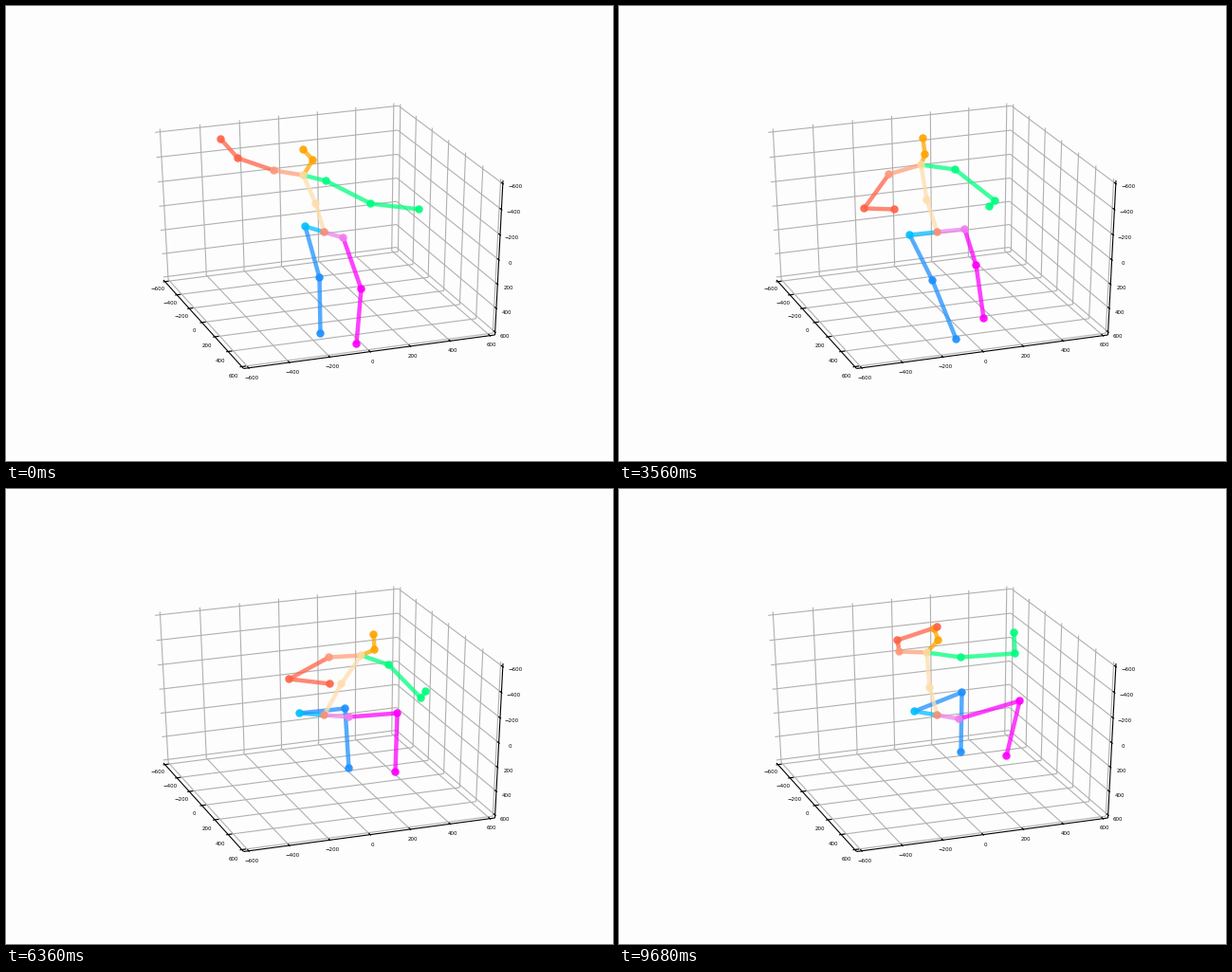
Write a matplotlib script that moves like this. It is 640 px wide and 480 px high and loops after 9.72 s.

```python
import matplotlib.pyplot as plt
import numpy as np
from matplotlib.animation import FuncAnimation
from matplotlib.collections import LineCollection

W, H, DPI = 640, 480, 100
FRAMES, STEP = 243, 40
BG = "#fdfdfd"

fig = plt.figure(figsize=(W / DPI, H / DPI), dpi=DPI, facecolor=BG)
ax = fig.add_axes([0, 0, 1, 1])
ax.set_xlim(-0.5, W - 0.5)
ax.set_ylim(H - 0.5, -0.5)
ax.axis("off")


# ---- room: three panes seen in perspective ----

def pane(p00, p10, p11, p01):
    """Projective map from the unit square to a quadrilateral."""
    rows, rhs = [], []
    for (u, v), (x, y) in zip([(0, 0), (1, 0), (1, 1), (0, 1)], [p00, p10, p11, p01]):
        rows += [[u, v, 1, 0, 0, 0, -u * x, -v * x],
                 [0, 0, 0, u, v, 1, -u * y, -v * y]]
        rhs += [x, y]
    m = np.append(np.linalg.solve(rows, rhs), 1).reshape(3, 3)

    def project(u, v):
        p = m @ (u, v, 1)
        return p[:2] / p[2]
    return project


front_l, front_r = (250, 382), (515, 346.5)
back_l, back_r = (165.5, 288.5), (411, 257)
top_l, top_r, top_f = (156.5, 129.5), (413.3, 101.5), (523.5, 183.5)

floor = pane(back_l, back_r, front_r, front_l)
back = pane(top_l, top_r, back_r, back_l)
side = pane(top_r, top_f, front_r, back_r)

ticks = range(-600, 601, 200)
stops = [(t + 625) / 1250 for t in ticks]

grid = []
for wall in (floor, back, side):
    for s in stops:
        grid += [[wall(s, 0), wall(s, 1)], [wall(0, s), wall(1, s)]]
ax.add_collection(LineCollection(grid, colors="#b0b0b0", linewidths=0.8, zorder=1))

OUT, IN = 0.008, 0.016
marks = [[back_l, front_l], [front_l, front_r], [front_r, top_f]]
for s in stops:
    marks += [[floor(s, 1 - IN), floor(s, 1 + OUT)],
              [floor(-OUT, s), floor(IN, s)],
              [side(1 - IN, s), side(1 + OUT, s)]]
ax.add_collection(LineCollection(marks, colors="black", linewidths=0.8, zorder=2))


def label_axis(place, first, last):
    """Write the tick values; the offset drifts from first to last."""
    for i, (t, s) in enumerate(zip(ticks, stops)):
        offset = np.array(first) + (np.array(last) - first) * i / 6
        x, y = place(s) + offset
        ax.text(x, y, str(t).replace("-", "\u2212"), fontsize=4, color="black",
                family="DejaVu Sans", ha="center", va="center", zorder=2)


label_axis(lambda s: floor(s, 1), (3.5, 11), (2, 10))
label_axis(lambda s: floor(0, s), (-7.5, 8), (-8.5, 10))
label_axis(lambda s: side(1, s), (13.5, 3), (10, 4.5))


# ---- figure: key poses joined by a smooth curve ----

times = np.array([0, 1000, 2240, 3560, 4400, 5000, 6360, 7680, 8500, 9680])

torso = {
    "hip": [(335, 238)] * 10,
    "spine": [(326, 208), (327, 207), (335, 206), (324, 204), (337, 202),
              (343, 203), (353, 205), (336, 203), (331, 206), (327, 209)],
    "chest": [(313, 178), (316, 177), (330, 174), (318, 167), (345, 165),
              (358, 169), (374, 175), (343, 165), (334, 168), (324, 172)],
    "neck": [(323, 162), (325, 161), (334, 159), (322, 156), (353, 154),
             (368, 158), (388, 169), (355, 153), (346, 155), (336, 159)],
    "head": [(313, 151), (317, 149), (332, 143), (320, 139), (354, 139),
             (368, 143), (387, 153), (350, 141), (342, 143), (332, 147)],
}
left_arm = {
    "l_shoulder": [(337, 184), (342, 184), (361, 186), (354, 172), (379, 176),
                   (390, 180), (403, 185), (375, 177), (367, 177), (360, 177)],
    "l_elbow": [(384, 208), (390, 209), (394, 223), (396, 205), (413, 211),
                (433, 216), (437, 220), (421, 206), (420, 193), (417, 173)],
    "l_wrist": [(435, 214), (440, 213), (420, 218), (390, 211), (404, 206),
                (427, 210), (442, 213), (430, 187), (425, 170), (416, 151)],
}
right_arm = {
    "r_shoulder": [(282, 173), (285, 172), (298, 174), (284, 177), (308, 169),
                   (321, 172), (340, 177), (312, 168), (303, 170), (295, 171)],
    "r_elbow": [(244, 160), (248, 162), (271, 203), (258, 213), (268, 201),
                (281, 202), (298, 200), (282, 190), (273, 180), (293, 159)],
    "r_wrist": [(226, 140), (231, 142), (312, 206), (290, 214), (290, 204),
                (308, 207), (341, 205), (324, 178), (322, 164), (335, 145)],
}
left_leg = {
    "l_hip": [(355, 244), (356, 244), (358, 243), (364, 235), (365, 237),
              (364, 239), (361, 240), (360, 242), (359, 242), (358, 242)],
    "l_knee": [(374, 298), (374, 298), (374, 297), (376, 273), (390, 277),
               (399, 264), (412, 236), (418, 224), (420, 223), (422, 223)],
    "l_ankle": [(369, 356), (369, 356), (366, 357), (384, 329), (408, 338),
                (409, 330), (410, 298), (408, 283), (408, 282), (408, 281)],
}
right_leg = {
    "r_hip": [(315, 232), (314, 232), (312, 233), (306, 241), (305, 239),
              (306, 238), (309, 236), (310, 234), (310, 234), (311, 234)],
    "r_knee": [(330, 286), (330, 285), (330, 275), (330, 289), (312, 268),
               (328, 256), (357, 231), (358, 217), (359, 216), (361, 214)],
    "r_ankle": [(331, 345), (331, 344), (332, 332), (355, 351), (311, 324),
                (330, 318), (361, 294), (360, 279), (360, 278), (360, 277)],
}
joints = {**torso, **left_arm, **right_arm, **left_leg, **right_leg}
names = list(joints)
keys = np.array(list(joints.values()), float).transpose(1, 0, 2)
slopes = np.gradient(keys, times, axis=0)

dot_colors = {
    "hip": "#f58f78", "spine": "#ffdead", "chest": "#fbdc9e",
    "neck": "#ffa500", "head": "#ffa500",
    "l_shoulder": "#00ff7f", "l_elbow": "#00ff7f", "l_wrist": "#00ff7f",
    "r_shoulder": "#fd9a7c", "r_elbow": "#ff6347", "r_wrist": "#ff6347",
    "l_hip": "#f07cf0", "l_knee": "#ff00ff", "l_ankle": "#ff00ff",
    "r_hip": "#00bfff", "r_knee": "#1e90ff", "r_ankle": "#1e90ff",
}
chains = [
    (("hip", "r_hip"), "#00bfff"),
    (("r_hip", "r_knee", "r_ankle"), "#1e90ff"),
    (("hip", "l_hip"), "#ee82ee"),
    (("l_hip", "l_knee", "l_ankle"), "#ff00ff"),
    (("hip", "spine", "chest"), "#ffdead"),
    (("chest", "neck", "head"), "#ffa500"),
    (("chest", "l_shoulder", "l_elbow", "l_wrist"), "#00ff7f"),
    (("chest", "r_shoulder"), "#ffa07a"),
    (("r_shoulder", "r_elbow", "r_wrist"), "#ff6347"),
]
bones, bone_colors = [], []
for chain, color in chains:
    for a, b in zip(chain, chain[1:]):
        bones.append((names.index(a), names.index(b)))
        bone_colors.append(color)


def pose(t):
    """Cubic Hermite curve through the key poses."""
    i = min(np.searchsorted(times, t, side="right") - 1, len(times) - 2)
    span = times[i + 1] - times[i]
    s = (t - times[i]) / span
    return ((1 + 2 * s) * (1 - s) ** 2 * keys[i]
            + s * (1 - s) ** 2 * span * slopes[i]
            + s * s * (3 - 2 * s) * keys[i + 1]
            + s * s * (s - 1) * span * slopes[i + 1])


start = pose(0)
limbs = LineCollection(start[bones], colors=bone_colors, linewidths=3.2,
                       alpha=0.75, zorder=3)
ax.add_collection(limbs)
dots = ax.scatter(start[:, 0], start[:, 1], s=37, linewidths=0, alpha=0.92,
                  c=[dot_colors[n] for n in names], zorder=4)


def draw(frame):
    points = pose(frame * STEP)
    limbs.set_segments(points[bones])
    dots.set_offsets(points)
    return limbs, dots


anim = FuncAnimation(fig, draw, frames=FRAMES, interval=STEP, repeat=True,
                     repeat_delay=0)
plt.show()
```
